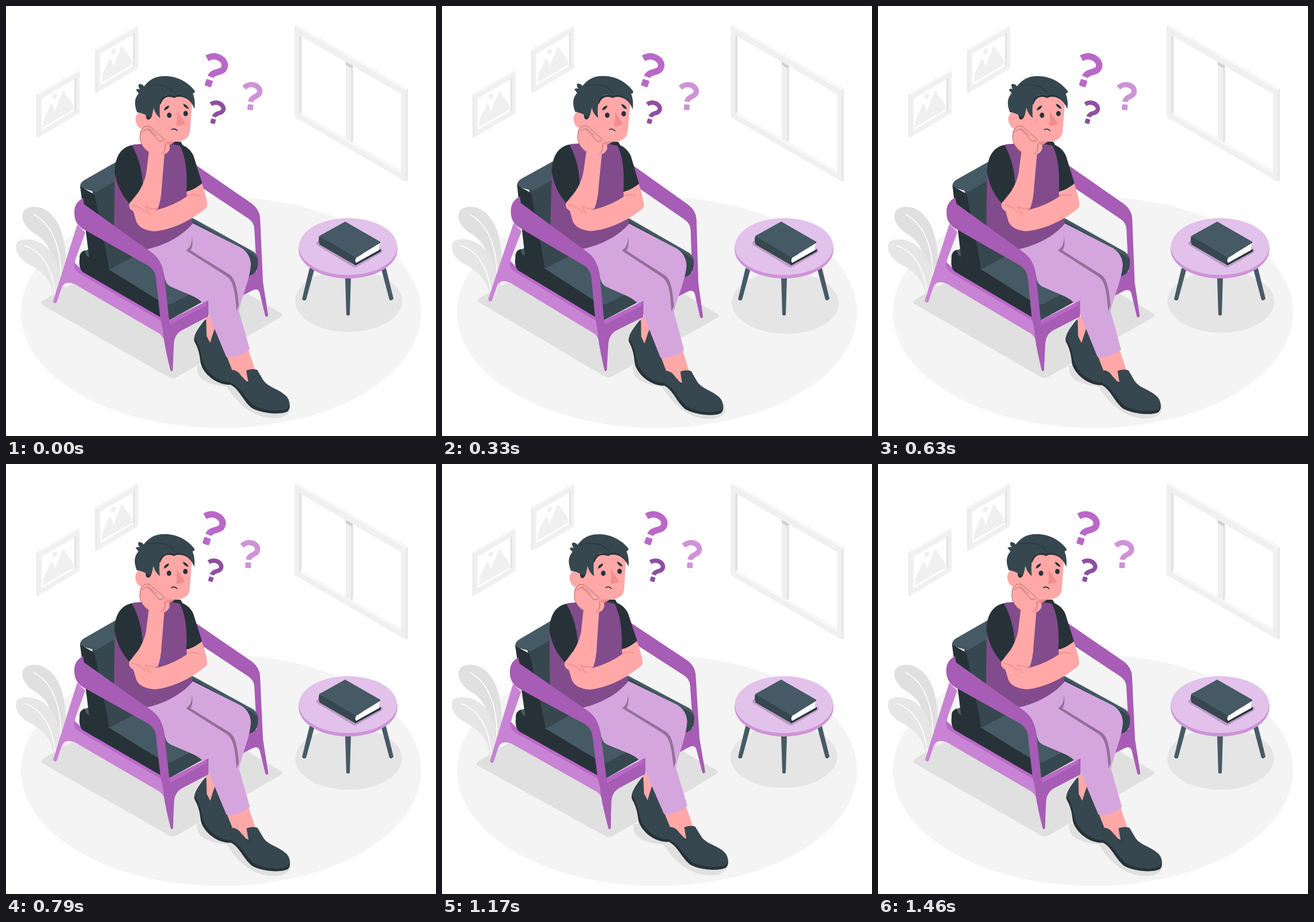
An HTML page with a canvas for the animation above (1500 ms loop, 748 by 748 pixels).

```html
<!DOCTYPE html>
<html lang="en">
<head>
<meta charset="utf-8">
<title>Worried man in an armchair</title>
<style>
html, body { margin: 0; width: 100%; height: 100%; overflow: hidden; background: #fff; }
canvas { display: block; width: 748px; height: 748px; }
</style>
</head>
<body>
<canvas id="stage" width="748" height="748"></canvas>
<script>
const ctx = document.getElementById('stage').getContext('2d');
const LOOP = 1500, FRAMES = 36;
const C = {
  ink: '#263238', slate: '#37474f', steel: '#455a64',
  purple: '#a75cb5', violet: '#ba68c8', orchid: '#c983d4', plum: '#824b8c', lilac: '#d5a6de',
  skin: '#ffa8a7', blush: '#ee8c8c', line: '#9a5560',
  pale: '#f0f0f0', grey: '#e0e0e0'
};

const paths = new Map();
function path(d) {
  if (!paths.has(d)) paths.set(d, new Path2D(d));
  return paths.get(d);
}
function fill(color, d) {
  ctx.fillStyle = color;
  ctx.fill(path(d));
}
function stroke(color, width, d, cap = 'round') {
  ctx.strokeStyle = color;
  ctx.lineWidth = width;
  ctx.lineCap = cap;
  ctx.lineJoin = 'round';
  ctx.stroke(path(d));
}
function ellipse(color, x, y, rx, ry, tilt = 0) {
  ctx.fillStyle = color;
  ctx.beginPath();
  ctx.ellipse(x, y, rx, ry, tilt, 0, Math.PI * 2);
  ctx.fill();
}
function group(draw, x = 0, y = 0, angle = 0, scale = 1) {
  ctx.save();
  ctx.translate(x, y);
  ctx.rotate(angle);
  ctx.scale(scale, scale);
  draw();
  ctx.restore();
}
function turned(draw, angle, x, y) {
  group(() => { ctx.translate(-x, -y); draw(); }, x, y, angle);
}

// Linear interpolation between [position, value] keys.
function tween(keys, p) {
  const i = keys.findIndex(k => k[0] > p);
  const [[a, from], [b, to]] = [keys[i - 1], keys[i]];
  return from + (to - from) * (p - a) / (b - a);
}
const SWAY = [[0, 0], [.25, 1], [.75, -1], [1, 0]];
const SHAKE = [[0, 0], [.1, -1.5], [.2, 2.7], [.3, -6], [.4, 6.2], [.5, -6],
  [.6, 2.2], [.67, -6.5], [.78, 6.5], [.9, -1.5], [1, 0]];

function picture() {
  fill('#ebebeb', 'M155 76L227 35 230 36V108L157 151 155 150Z');
  fill('#f7f7f7', 'M155 75L227 34 230 36 158 78Z');
  fill(C.pale, 'M158 78L230 36V108L158 151Z');
  fill('#e3e3e3', 'M221 49L224 47V105L221 103Z');
  fill('#fff', 'M164 83L221 50V104L164 138Z');
  fill(C.pale, 'M166 133Q168 112 173 108L180 92Q184 92 187 105L200 72Q203 68 207 78L212 84Q219 90 220 102Z');
  ellipse(C.pale, 187, 79, 4, 5, .5);
}

function windowFrame() {
  fill('#e9e9e9', 'M502 35L506 33 699 144V303L695 305 502 193Z');
  fill('#f8f8f8', 'M502 35L506 33 699 144 695 147Z');
  fill(C.pale, 'M502 35L695 147V305L502 193Z');
  fill(C.grey, 'M510 51L514 53V184L510 188Z');
  fill('#f8f8f8', 'M510 188L514 184 687 284V291Z');
  fill('#fff', 'M514 53L687 153V285L514 185Z');
  fill(C.pale, 'M591 97L600 102V237L591 232Z');
  fill('#e4e4e4', 'M600 102L604 105V234L600 237Z');
  fill('#cfcfcf', 'M591 97L604 105 600 108 591 102Z');
}

function plant() {
  fill(C.grey, 'M101 494C109 440 103 390 82 366C68 348 43 345 32 355C24 365 30 382 47 394C73 408 87 434 91 495Z');
  stroke('#fff', 1.7, 'M49 363C84 382 99 428 95 492');
  fill('#e6e6e6', 'M83 506C80 478 64 463 43 451C23 442 13 424 19 411C28 402 57 404 72 421C91 440 98 470 97 503Z');
  stroke('#fff', 1.7, 'M33 417C62 426 82 456 86 506');
}

function shadows() {
  ellipse('#e5e5e5', 596, 513, 93, 54);
  fill(C.grey, 'M65 512L246 407Q253 403 260 407L478 534Q484 537 478 541L298 645Q290 650 282 645L65 521Q57 517 65 512Z');
  fill(C.grey, 'M333 625C329 650 350 658 384 662C400 688 426 716 465 717C491 717 498 704 493 691L400 630Z');
}

function table() {
  fill(C.steel, 'M528 456H537L522 511Q518 514 515 510ZM590 472H600L598 537Q595 540 592 537ZM653 458L661 456 674 509Q671 514 667 511Z');
  ellipse('#ce93d8', 595, 423, 86, 51);
  ellipse('#e2c2ea', 595, 418.5, 85.5, 49.5);
  fill('#ba9bc4', 'M541 410L590 381 655 424Q656 428 650 431L610 454Q606 456 602 453L543 417Q538 414 541 410Z');
  fill(C.ink, 'M545 401L607 434 652 423V427L608 451 546 415Q543 410 545 401Z');
  fill('#fff', 'M609 438L650 413Q648 419 650 424L609 447Q606 443 609 438Z');
  fill(C.steel, 'M545 400L590 375 651 410V412L608 438Z');
  fill(C.slate, 'M545 400L608 438Q605 444 607 450L546 415Q543 408 545 400Z');
}

function chairBack() {
  fill(C.purple, 'M322 271L428 344Q441 354 442 369L447 480 456 538Q454 543 451 539L442 502Q440 489 428 495L405 507V480L436 461 432 387Q431 376 422 370L335 312Z');
  // side frame
  fill(C.orchid, 'M124 380L82 513Q83 519 88 516L98 487Q105 478 120 484L267 570Q277 578 277 592L287 570 269 541 128 463Q116 455 121 440L138 394Z');
  fill(C.violet, 'M119 446Q116 459 129 466L270 548 272 541 129 456Z');
  // seat
  fill(C.ink, 'M128 440Q127 428 137 425L280 505 283 547 268 541 134 463Q126 457 128 440Z');
  fill(C.slate, 'M268 508L288 512 438 438Q440 460 430 466L283 547 268 541Z');
  fill(C.steel, 'M137 426L220 390 325 369 430 427Q437 432 438 440L288 518Q279 522 270 515L140 434Z');
  fill(C.slate, 'M325 374L428 432Q435 437 438 440 438 460 429 467L400 475 320 395Z');
  // backrest
  fill(C.slate, 'M150 322L196 295 220 437 181 458Z');
  fill(C.steel, 'M129 316Q128 308 136 303L192 271 198 300 156 324Z');
  fill(C.ink, 'M129 314L149 325Q154 327 155 333L180 457Q171 459 164 455L145 440Z');
}

function chairFront() {
  fill(C.purple, 'M283 549L352 512V540L306 564Q293 571 292 588L290 633Q288 638 286 633L276 588Z');
  fill(C.violet, 'M281 548L348 514 350 520 286 554Z');
  fill(C.purple, 'M134 334Q117 343 119 363Q120 379 134 388L248 452Q260 460 261 475L268 540 273 565Q275 590 286 633Q288 637 290 633L291 588Q284 553 281 520L275 469Q272 443 255 430L136 345Z');
}

function feet() {
  fill(C.ink, 'M346 546C333 562 325 575 328 584C337 600 337 612 339 623C346 644 370 660 391 659L400 645 365 560Z');
  fill(C.slate, 'M347 545C336 560 326 571 329 579C340 597 339 607 343 620C350 639 371 655 391 654L400 640 366 560Z');
  fill(C.skin, 'M348 541L349 574 355 586Q358 576 363 561L355 540Z');
  fill(C.skin, 'M383 607L394 635 422 658 419 634 433 632 421 596Z');
  fill(C.ink, 'M390 642L391 659C407 668 411 685 427 699C444 709 478 712 490 705Q495 700 493 690L470 672Z');
  fill(C.slate, 'M394 633Q389 642 391 655C408 663 415 681 430 694C446 704 477 707 490 700Q497 689 487 678C473 665 456 664 447 650L437 633Q428 630 418 634Q420 647 422 657L409 643Q403 634 394 633Z');
}

function trousers() {
  fill(C.lilac, 'M228 426C264 422 303 405 325 378L408 420Q425 430 426 450C424 477 411 503 405 530L424 597Q404 613 383 610L351 533Q346 513 321 503L286 488Q277 484 275 468Q272 447 255 433Z');
  fill('#947099', 'M323 401C324 415 319 421 313 425L382 469C394 477 398 489 401 530L405 520C402 490 399 473 387 466L321 425Q327 415 323 401Z');
}

function torso() {
  fill(C.ink, 'M286 236L304 236 309 245 288 248Z');
  fill(C.plum, 'M222 241C200 250 190 270 189 300L188 380Q188 405 211 421Q222 427 234 426C275 423 308 412 325 381L315 324Q319 270 303 243L272 237Z');
  fill(C.ink, 'M219 242C199 246 189 264 189 290Q194 321 215 344Q226 325 238 318Q238 276 219 242Z');
  fill(C.ink, 'M301 240Q318 244 326 260L341 308Q327 321 314 323Q317 267 301 240Z');
  fill(C.skin, 'M274 229H289Q283 240 285 248Q282 258 270 259Z');
}

function arms() {
  fill(C.skin, 'M314 323Q329 319 341 309Q348 329 350 344Q351 350 345 354C321 373 290 389 258 392Q234 390 227 376L220 352 235 360 265 354Q294 346 315 331Z');
  fill(C.skin, 'M249 250L244 290Q239 318 215 343Q211 351 222 358L242 362 264 353Q270 338 271 314L276 253Z');
  stroke(C.blush, 1.5, 'M219 347Q231 347 243 359M242 349Q252 354 264 352M244 350Q247 361 252 363M315 330Q326 326 336 330');
}

function head() {
  fill(C.skin, 'M247 187Q238 182 229 187Q222 195 228 207Q233 216 245 213L262 234Q277 237 295 236Q318 235 320 218L324 164 300 150 262 158Z');
  fill(C.blush, 'M277 235Q288 237 294 236 287 243 277 240Z');
  fill('#f08e8e', 'M297 182L312 205Q305 209 296 208 299 196 297 182Z');
  ellipse(C.ink, 284, 190, 4, 4.5);
  ellipse(C.ink, 312.5, 187, 4, 4.5);
  fill(C.ink, 'M275 182Q275 175 284 173Q284 179 275 182ZM308 170Q316 172 318 179Q310 178 308 170Z');
  stroke(C.ink, 1.5, 'M288 215Q294 212 298 217');
  // hair
  fill(C.ink, 'M244 185H255Q253 198 247 198Q242 196 244 185ZM262 170Q272 152 291 155Q310 150 323 160L328 179Q323 166 314 161Q301 155 293 160Q275 153 269 171Z');
  fill(C.slate, 'M247 192Q238 186 228 185C222 169 224 160 231 152L226 146Q229 143 233 145Q229 139 231 136Q237 135 240 140Q254 121 277 122C298 122 316 132 328 147Q330 151 325 152Q330 165 328 179Q324 164 314 159Q301 151 293 157Q276 150 269 164Q266 179 268 195Q259 188 257 177L254 190Q250 195 247 192Z');
  stroke(C.ink, 1, 'M246 139C268 135 285 139 294 152');
  // resting hand
  fill(C.skin, 'M233 224C232 218 235 211 241 210Q248 204 255 211L272 224Q279 231 279 238Q278 256 268 258L249 255Q232 244 233 224Z');
  stroke(C.line, .8, 'M233 228Q234 214 241 210Q247 207 252 211L277 233M238 219Q244 211 250 217L266 235Q271 237 275 234M247 212L262 226M233 228Q232 243 249 254M277 239Q279 252 271 258');
}

function character() {
  chairBack();
  feet();
  torso();
  trousers();
  chairFront();
  arms();
  head();
}

function questionMark(color, x, y, angle, scale) {
  group(() => {
    stroke(color, 11, 'M-17 -20C-12 -25.5 -7 -28 -1 -28C9 -28 17 -23 17 -14.5C17 -3 0 -4 -.5 8.5', 'butt');
    fill(color, 'M-4 14H4Q6 14 6 16V24Q6 26 4 26H-4Q-6 26 -6 24V16Q-6 14 -4 14Z');
  }, x, y, angle, scale);
}

function render(time) {
  // The motion is stepped at 24 frames per second.
  const frame = Math.floor((time % LOOP + 5) * FRAMES / LOOP) % FRAMES;
  const p = frame / FRAMES;
  const sway = tween(SWAY, p) * Math.PI / 180;

  ctx.fillStyle = '#fff';
  ctx.fillRect(0, 0, 748, 748);
  ellipse('#f4f4f4', 374, 533, 348, 201);
  group(picture);
  group(picture, -102, 78);
  windowFrame();
  turned(shadows, sway, 375, 590);
  plant();
  table();
  turned(character, sway, 288, 415);
  group(() => {
    questionMark(C.violet, 359.2, 115.3, .33, 1);
    questionMark('#ce93d8', 426.5, 159.8, .09, .82);
    questionMark('#904ea0', 363.9, 187.2, .27, .69);
  }, tween(SHAKE, p));
}

const start = performance.now();
function tick(now) {
  render(Math.max(0, now - start));
  requestAnimationFrame(tick);
}
render(0);
requestAnimationFrame(tick);
</script>
</body>
</html>
```
